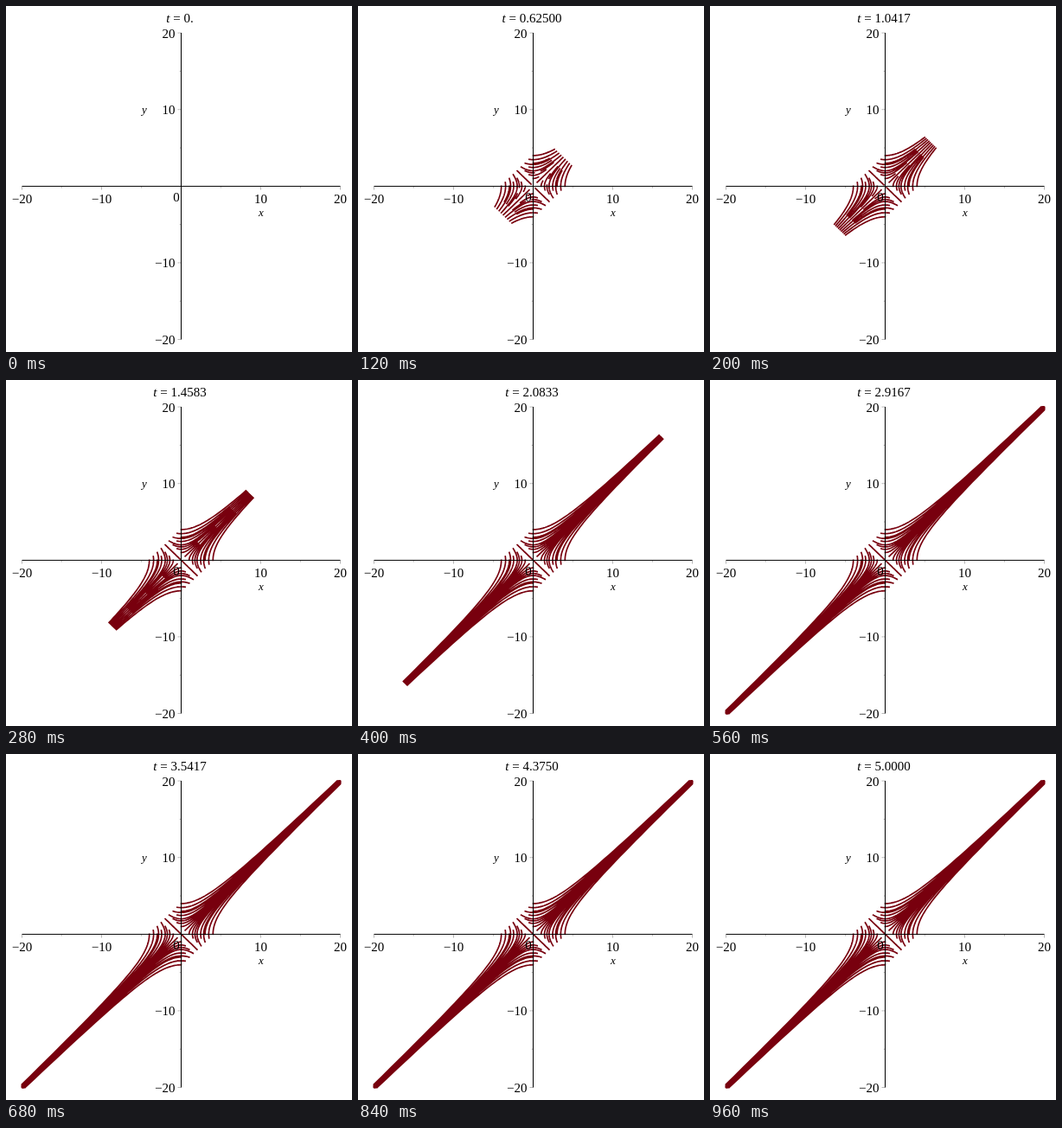
An HTML page for the animation above (1000 ms loop, 400 by 400 pixels).

```html
<!DOCTYPE html>
<html>
<head>
<meta charset="utf-8">
<style>
  html, body { margin: 0; width: 100%; height: 100%; overflow: hidden; background: #fff; }
  svg { display: block; width: 100%; height: 100%; }
  text { font: 15px "Liberation Serif", "Times New Roman", serif; text-anchor: middle; }
  .var { font-style: italic; }
  .axis { font-size: 13px; }
  #curves { fill: none; stroke: #78000e; stroke-width: 1.7; stroke-linecap: square; stroke-linejoin: round; }
</style>
</head>
<body>
<svg viewBox="0 0 400 400">
  <path id="curves"/>
  <path id="ticks" stroke="#999" stroke-width="0.7"/>
  <path d="M18.5 208.4H386.5M202.5 31V385.5" stroke="#000"/>
  <text x="201" y="19"><tspan class="var">t</tspan> = <tspan id="time">0.</tspan></text>
  <text class="var axis" x="295" y="243">x</text>
  <text class="var axis" x="160" y="124">y</text>
  <text x="197" y="226">0</text>
  <g id="labels"></g>
</svg>
<script>
const LIMIT = 20, STEPS = 24, FRAME_MS = 40, T_MAX = 5;
const byId = id => document.getElementById(id);
const px = x => 202.5 + 9.2 * x;
const py = y => 208.3 - 8.86 * y;

function drawScale() {
  let ticks = "", labels = "";
  for (let v = -LIMIT; v <= LIMIT; v += 5) {
    if (!v) continue;
    const major = v % 10 === 0, size = major ? 4 : 2;
    ticks += `M${px(v)} 208.5v${size}M202.5 ${py(v)}h${-size}`;
    if (!major) continue;
    const name = String(v).replace("-", "\u2212");
    labels += `<text x="${px(v)}" y="228">${name}</text>` +
      `<text x="195.5" y="${py(v) + 5.5}" style="text-anchor:end">${name}</text>`;
  }
  byId("ticks").setAttribute("d", ticks);
  byId("labels").innerHTML = labels;
}

// x = a e^t + b e^-t, y = a e^t - b e^-t, cut where it leaves the view
function curve(a, b, time) {
  const exit = Math.log((LIMIT + Math.sqrt(LIMIT * LIMIT - 4 * Math.abs(a * b))) / (2 * Math.abs(a)));
  const end = Math.min(time, exit), n = 40;
  let d = "";
  for (let i = 0; i <= n; i++) {
    const grow = a * Math.exp(end * i / n), fade = b * Math.exp(-end * i / n);
    d += (i ? "L" : "M") + px(grow + fade).toFixed(2) + " " + py(grow - fade).toFixed(2);
  }
  return d;
}

function draw(step) {
  const time = T_MAX * step / STEPS;
  let d = "";
  if (step) {
    for (let a = -2; a <= 2; a += 0.5)
      for (let b = -2; b <= 2; b += 0.5)
        if (a || b) d += curve(a, b, time);
  }
  byId("curves").setAttribute("d", d);
  byId("time").textContent = step ? time.toPrecision(5) : "0.";
}

let shown = -1;
function tick() {
  const step = Math.floor(performance.now() / FRAME_MS) % (STEPS + 1);
  if (step !== shown) draw(shown = step);
  requestAnimationFrame(tick);
}

drawScale();
tick();
</script>
</body>
</html>
```
